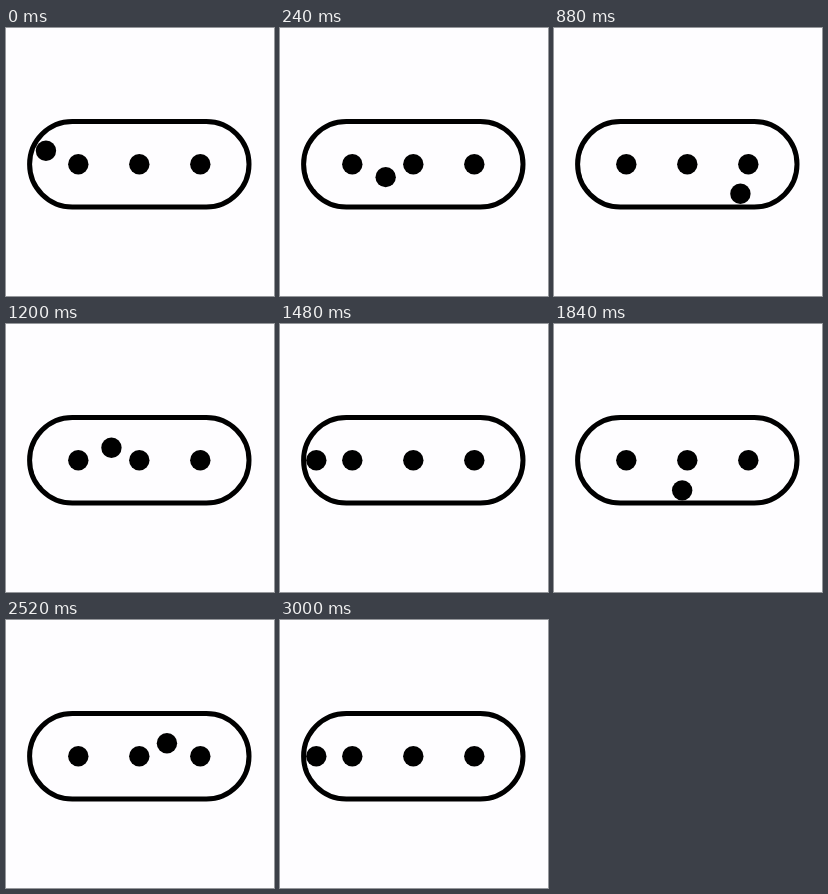
Animation of 268 by 268 pixels, one loop 3040 ms. Source, as an HTML page:

```html
<!DOCTYPE html>
<html lang="en">
<head>
<meta charset="utf-8">
<title>Weaving dot</title>
<style>
  html, body { margin: 0; width: 100%; height: 100%; overflow: hidden; background: #fefdff; }
  svg { display: block; width: 100vw; height: 100vh; }
</style>
</head>
<body>
<svg viewBox="0 0 268 268">
  <rect x="23.6" y="93.6" width="219.4" height="85.4" rx="42.7" fill="none" stroke="#000" stroke-width="5"/>
  <circle cx="72.3" cy="136.2" r="10.2"/>
  <circle cx="133.3" cy="136.2" r="10.2"/>
  <circle cx="194.3" cy="136.2" r="10.2"/>
  <circle id="runner" r="10.2"/>
</svg>
<script>
  const STEP = 40, HALF = 19, LOOP = 3040;
  const CX = 133.3, CY = 136.2, GAP = 61;
  const RX = GAP / 2, RY = 30.6, END_RX = 36;
  // [step, degrees swept] for one crossing: half a turn round each dot
  const sweep = [[0, 0], [1, 26], [4, 105], [5, 130], [7, 205], [10, 288],
                 [13, 360], [14, 406], [15, 427], [18, 514], [19, 540]];
  const runner = document.getElementById('runner');

  function angleAt(step) {
    const i = sweep.findIndex(([s]) => s > step);
    const [s0, a0] = sweep[i - 1], [s1, a1] = sweep[i];
    return a0 + (a1 - a0) * (step - s0) / (s1 - s0);
  }

  // Offset from the centre while weaving left to right
  function weave(angle) {
    const dot = Math.floor(angle / 180);
    const local = angle % 180;
    const outer = (dot === 0 && local < 90) || (dot === 2 && local > 90);
    const rad = local * Math.PI / 180;
    const side = dot === 1 ? 1 : -1;
    return [(dot - 1) * GAP - (outer ? END_RX : RX) * Math.cos(rad),
            side * RY * Math.sin(rad)];
  }

  function draw(time) {
    const step = (Math.floor(time % LOOP / STEP) + 1) % (2 * HALF);
    const [dx, dy] = weave(angleAt(step % HALF));
    const dir = step < HALF ? 1 : -1; // the way back is turned by 180 degrees
    runner.setAttribute('cx', CX + dir * dx);
    runner.setAttribute('cy', CY + dir * dy);
  }

  const start = performance.now();
  function tick() {
    draw(performance.now() - start);
    requestAnimationFrame(tick);
  }
  tick();
</script>
</body>
</html>
```
